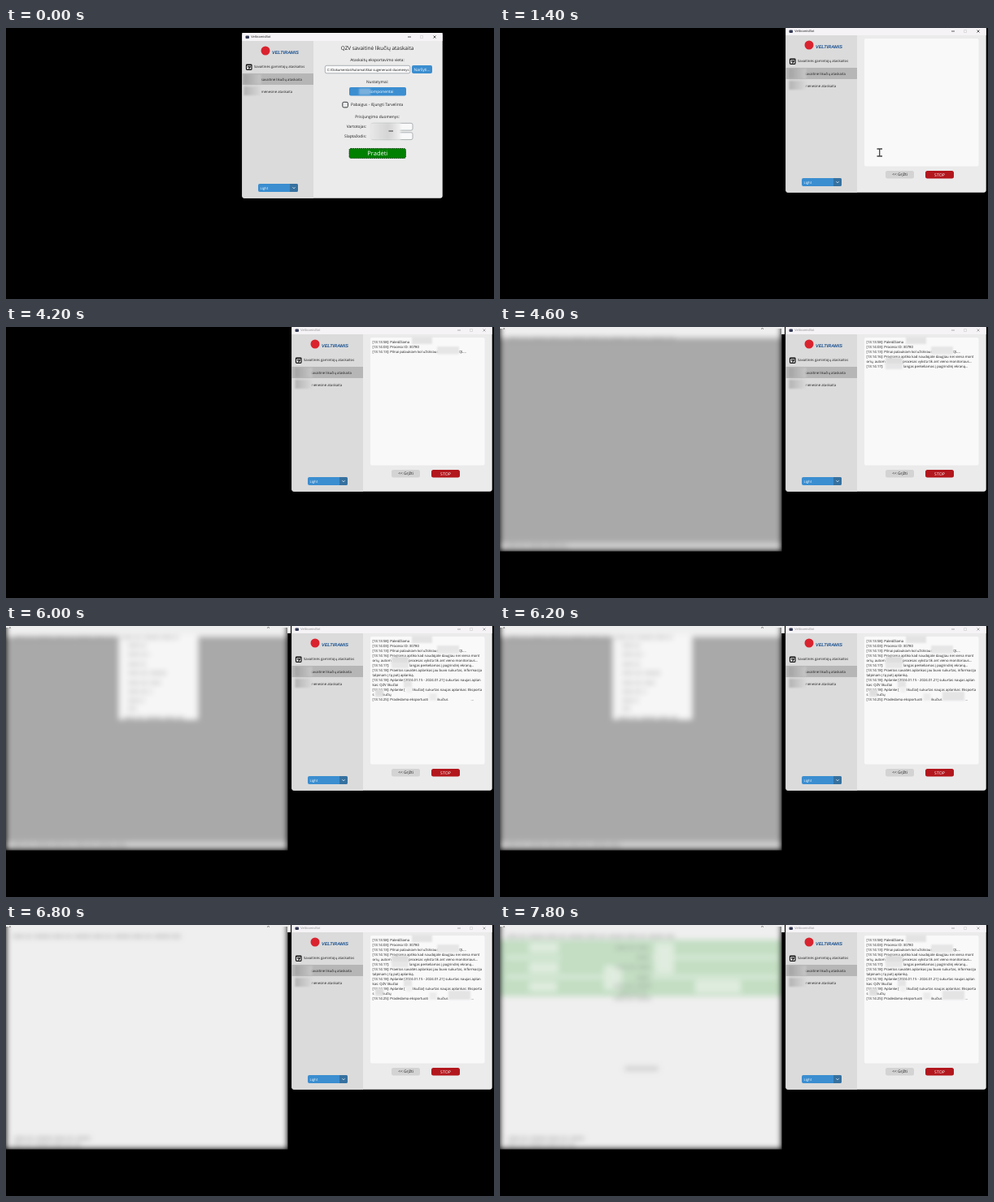
An HTML page that plays this animation: 600 px wide and 334 px high, repeating every 8 s.

```html
<!DOCTYPE html>
<html lang="lt">
<head>
<meta charset="utf-8">
<style>
html, body { margin: 0; width: 100%; height: 100%; overflow: hidden; background: #000; }
svg { display: block; width: 100vw; height: 100vh; }
text { font: 4.25px "Open Sans", "Noto Sans", sans-serif; fill: #1a1a1a; text-rendering: geometricPrecision; }
.label { font-size: 4.85px; }
.mid { text-anchor: middle; }
.end { text-anchor: end; }
.white { fill: #fff; }
.blue { fill: #3b8ed0; }
.field { fill: #f9f9fa; stroke: #8f959a; stroke-width: .7; }
.soft { filter: url(#soft); }
.smear { filter: url(#smear); }
.blots { stroke: #666; stroke-width: 4; stroke-dasharray: 14 2 8 3 20 2; fill: none; }
</style>
</head>
<body>
<svg viewBox="0 0 600 334">
<defs>
  <filter id="soft" x="-20%" y="-20%" width="140%" height="140%"><feGaussianBlur stdDeviation=".8"/></filter>
  <filter id="smear" filterUnits="userSpaceOnUse" x="-20" y="-20" width="400" height="320"><feGaussianBlur stdDeviation="3.6"/></filter>
  <clipPath id="leftClip"><path d="M0 0H346.500V276.500H0z"/></clipPath>
  <linearGradient id="sky" x2="0" y2="1">
    <stop offset="0" stop-color="#b8cbe4"/><stop offset=".5" stop-color="#ccdaed"/>
    <stop offset=".75" stop-color="#d2dfe9"/><stop offset="1" stop-color="#d0dfd6"/>
  </linearGradient>
  <linearGradient id="hideA"><stop stop-color="#a4a4a4"/><stop offset="1" stop-color="#c6c6c6"/></linearGradient>
  <linearGradient id="hideB"><stop stop-color="#b4b4b4"/><stop offset="1" stop-color="#d9d9d9"/></linearGradient>
  <linearGradient id="hideC"><stop stop-color="#e9e9e9"/><stop offset=".6" stop-color="#d4d4d4"/><stop offset="1" stop-color="#f0f0f0"/></linearGradient>
</defs>

<!-- blurred program on the left -->
<g data-t="4600">
  <path d="M0 0H350V9H346V2H0z" fill="#eee"/>
  <g clip-path="url(#leftClip)">
    <g class="smear">
      <path d="M0 -12H346V276H0z" fill="#efefef"/>
      <g data-t="4600 6400">
        <path d="M0 13H346V266H0z" fill="#a9a9a9"/>
        <path d="M0 266H346V276H0z" fill="#d0d0d0"/>
        <path class="blots" d="M10 14H215" opacity=".3"/>
        <path class="blots" d="M8 270H85" opacity=".3"/>
      </g>
      <g data-t="6000 6400">
        <path d="M139 10H236V115H139z" fill="#f6f6f6"/>
        <path class="blots" d="M142 14H212M150 24H172M150 35H178M150 47H172M150 58H198M150 70H190M150 81H180M150 92H170M150 102H160M145 113H218" opacity=".3"/>
        <path class="blots" d="M85 270H150" opacity=".3"/>
      </g>
      <g data-t="6400 6600">
        <path d="M0 10H346V264H0z" fill="url(#sky)"/>
        <path d="M20 203H335V255H20z" fill="#d4e3c4" opacity=".55"/>
        <path d="M0 9H215V20H0z" fill="#c6c9cd"/>
        <path d="M0 264H346V276H0z" fill="#d8d8d8"/>
        <path class="blots" d="M10 15H215M8 270H140" opacity=".45"/>
      </g>
      <g data-t="6600">
        <path class="blots" d="M8 14H215M10 263H104M8 271H92" opacity=".35"/>
      </g>
      <g data-t="7000">
        <path d="M0 18H346V88H0z" fill="#c3dec3"/>
        <path d="M8 40H75M185 40H342M8 64H140M185 64H342" stroke="#dcebdc" stroke-width="4"/>
        <path d="M36 22H72V34H36zM36 46H72V59H36zM36 70H70V82H36zM128 50H150V80H128zM190 22H214V60H190zM240 68H296V84H240z" fill="#dfecdf"/>
        <path class="blots" d="M142 28H182M168 40H186M142 52H184M168 65H186M140 75H186M146 84H180M140 91H186" opacity=".28"/>
        <path d="M153 177H195" stroke="#cfcfcf" stroke-width="6"/>
      </g>
    </g>
    <path d="M0 0H346V2H0z" fill="#eee"/>
    <path d="M4 2H6M321 2.500L322.500 1.500L324 2.500" stroke="#555" stroke-width=".8" fill="none"/>
  </g>
</g>

<!-- bot window -->
<g id="bot">
  <rect x="-.7" y="0" width="246.400" height="203.700" rx="3" fill="#ebebeb"/>
  <path d="M-.7 0H245.700V10H-.7z" fill="#f5f3f6"/>
  <path d="M-.7 10H87V203.700H2.300a3 3 0 0 1 -3 -3z" fill="#dbdbdb"/>
  <rect x="3.500" y="3.500" width="4.500" height="3.500" rx="1" fill="#343a55"/>
  <g id="caption">
    <text x="10.300" y="6.400" style="font-size:3.900px;fill:inherit">VeltiramisBot</text>
    <path d="M203 5H207M234.500 3.500L237.500 6.500M237.500 3.500L234.500 6.500" stroke="currentColor" stroke-width=".7"/>
  </g>
  <path d="M218.500 3.500h3v3h-3z" fill="none" stroke="#ccc" stroke-width=".6"/>

  <circle cx="28" cy="22" r="5.500" fill="#d9232e"/>
  <text x="36" y="26" style="font:italic bold 5.500px 'Liberation Sans',sans-serif;fill:#174f8f">VELTIRAMIS</text>

  <path d="M-.7 50H87V64H-.7z" fill="#b6b6b6"/>
  <rect x="4.500" y="39" width="6.500" height="6.300" rx=".8" fill="#eee" stroke="#111" stroke-width="1.200"/>
  <path d="M4.500 39.700H11M6 41.800H9.300L7.500 44.500" fill="none" stroke="#111" stroke-width="1.200"/>
  <text x="14" y="43.300">Savaitinės gamintojų ataskaitos</text>
  <text x="22.700" y="58.700">savaitinė likučių ataskaita</text>
  <text x="22.700" y="73.900">mėnesinė ataskaita</text>
  <g id="cover" class="soft">
    <path d="M1.500 51H22.500V63.500H1.500z" fill="url(#hideA)"/>
    <path d="M1.500 66H22.500V77H1.500z" fill="url(#hideB)"/>
  </g>

  <rect class="blue" x="19" y="186" width="49" height="10" rx="2"/>
  <path d="M58 186H66a2 2 0 0 1 2 2V194a2 2 0 0 1 -2 2H58z" fill="#36719f"/>
  <path d="M61.500 190.300L63 191.800L64.500 190.300" fill="none" stroke="#fff" stroke-width=".8"/>
  <text class="white" x="21.500" y="192.600">Light</text>

  <g data-t="0 1400">
    <text class="mid" x="165.500" y="21.200" style="font-size:6.400px">QZV savaitinė likučių ataskaita</text>
    <text class="label mid" x="165.500" y="34.700">Ataskaitų eksportavimo vieta:</text>
    <rect class="field" x="101.300" y="40.300" width="104.500" height="9.500" rx="2"/>
    <text x="104" y="46.600" style="font-size:4.100px">C:/Dokumentai/Automatiškai sugeneruoti duomenys</text>
    <rect class="blue" x="208" y="40" width="25" height="10" rx="2"/>
    <text class="label mid white" x="220.500" y="46.700">Naršyti...</text>
    <text class="label mid" x="165.500" y="61.700">Nustatymai:</text>
    <rect class="blue" x="131" y="67" width="70" height="10.500" rx="2"/>
    <text class="label end white" x="185.500" y="74">komponentai</text>
    <path class="soft" d="M143 68.500H157V76.500H143z" fill="#79b1dd"/>
    <rect x="122.800" y="85.300" width="6.600" height="6.600" rx="1.500" fill="none" stroke="#33383c"/>
    <text class="label" x="133" y="90.200">Pabaigus - Išjungti Tarvelinta</text>
    <text class="label mid" x="165.500" y="104.700">Prisijungimo duomenys:</text>
    <text class="label end" x="152" y="116.800">Vartotojas:</text>
    <text class="label end" x="152" y="128.800">Slaptažodis:</text>
    <rect class="field" x="158" y="111.300" width="51" height="8.800" rx="2"/>
    <rect class="field" x="158" y="122.800" width="51" height="8.800" rx="2"/>
    <path class="soft" d="M156 111H194V132H156z" fill="url(#hideC)"/>
    <path d="M179.500 121H185" stroke="#555" stroke-width="1.200"/>
    <rect x="131" y="142.500" width="69.500" height="12" rx="2" fill="#008000" stroke="#033c03" stroke-width=".9" stroke-dasharray="1.500 1"/>
    <text class="mid white" x="165.800" y="151.200" style="font-size:7.500px">Pradėti</text>
  </g>

  <g data-t="1400">
    <rect x="96" y="14" width="140.500" height="157.500" rx="2" fill="#f9f9fa"/>
    <g id="log"></g>
    <rect x="122" y="177" width="35" height="9.500" rx="2.500" fill="#d3d3d3"/>
    <text class="label mid" x="139.500" y="183.400">&lt;&lt; Grįžti</text>
    <rect x="171" y="177" width="35" height="9.500" rx="2.500" fill="#b2171d"/>
    <text class="mid white" x="188.500" y="183.600" style="font-size:5.200px">STOP</text>
  </g>
</g>

<!-- pointer -->
<g data-t="1400 2000" fill="none">
  <path d="M463.500 149H470M466.700 149V158M463.500 158H470" stroke="#fff" stroke-width="2.600"/>
  <path d="M463.500 149H470M466.700 149V158M463.500 158H470" stroke="#444" stroke-width="1.300"/>
</g>
<path id="arrow" data-t="2000 2400" d="M0 0V9L2.200 7L3.800 10.500L5.200 9.800L3.700 6.500H6.500z" fill="#fff"/>
</svg>

<script>
const LOOP = 8000;
const $ = id => document.getElementById(id);

// [time, row, x, text]
const lines = [
  [1600, 0, 98.5, '[13:13:58]: Paleidžiama'],
  [2400, 1, 98.5, '[13:14:03]: Proceso ID: 30780'],
  [4000, 2, 98.5, '[13:14:13]: Pilnai palaukiam kol užsikraus'],
  [4000, 2, 205, 'QL...'],
  [4400, 3, 98.5, '[13:14:16]: Programa aptiko kad naudojate daugiau nei viena mont'],
  [4400, 4, 98.5, 'orių, autom'],
  [4400, 4, 143, 'procesas vyksta tik ant vieno monitoriaus...'],
  [4600, 5, 98.5, '[13:14:17]:'],
  [4600, 5, 144, 'langas perkeliamas į pagrindinį ekraną...'],
  [4800, 6, 98.5, '[13:14:18]: Praeitos savaitės aplankas jau buvo sukurtas, informacija'],
  [4800, 7, 98.5, 'talpinam į tą patį aplanką.'],
  [4800, 8, 98.5, '[13:14:18]: Aplanke [2024.01.15 - 2024.01.21] sukurtas naujas aplan'],
  [4800, 9, 98.5, 'kas: QZV likučiai'],
  [4800, 10, 98.5, '[13:14:18]: Aplanke ['],
  [4800, 10, 147.5, 'likučiai] sukurtas naujas aplankas: Eksporta'],
  [4800, 11, 98.5, 's'],
  [4800, 11, 111, 'kučių'],
  [5800, 12, 98.5, '[13:14:25]: Pradedama eksportuoti'],
  [5800, 12, 178, 'ikučius'],
  [5800, 12, 219.5, '...']
];
// [time, x, y, width, height, shade]
const patches = [
  [1600, 147, 13, 25, 9, '#e3e3e4'],
  [4000, 178, 25, 27, 9.5, '#e6e6e7'],
  [4400, 122, 39, 21, 9, '#dededf'],
  [4600, 122, 46, 21, 7, '#e6e6e7'],
  [4800, 137, 69, 10, 8, '#e4e4e5'],
  [4800, 140, 76, 7, 7, '#efeff0'],
  [4800, 102, 79, 10, 9, '#dededf'],
  [5800, 168.5, 84, 9, 9, '#ebebec'],
  [6200, 192, 82, 27, 11, '#e4e4e5']
];
$('log').innerHTML =
  lines.map(([t, row, x, s]) => `<text data-t="${t}" x="${x}" y="${21 + row * 6}">${s}</text>`).join('') +
  patches.map(([t, x, y, w, h, c]) =>
    `<rect class="soft" data-t="${t}" x="${x}" y="${y}" width="${w}" height="${h}" fill="${c}"/>`).join('');

const timed = [...document.querySelectorAll('[data-t]')].map(el => {
  const [from, to = LOOP] = el.dataset.t.split(' ').map(Number);
  return { el, from, to };
});

function draw() {
  const t = performance.now() % LOOP;
  for (const { el, from, to } of timed) el.style.display = t >= from && t < to ? '' : 'none';
  const moved = t >= 1400;
  $('bot').setAttribute('transform', moved ? 'translate(352 -1)' : 'translate(291 6)');
  $('cover').setAttribute('transform', `translate(${moved ? 2 : 0} 0)`);
  $('caption').style.color = $('caption').style.fill = t < 2400 ? '#1a1a1a' : '#8c8c8c';
  $('arrow').setAttribute('transform', t < 2200 ? 'translate(522 240)' : 'translate(586 322)');
  requestAnimationFrame(draw);
}
draw();
</script>
</body>
</html>
```
